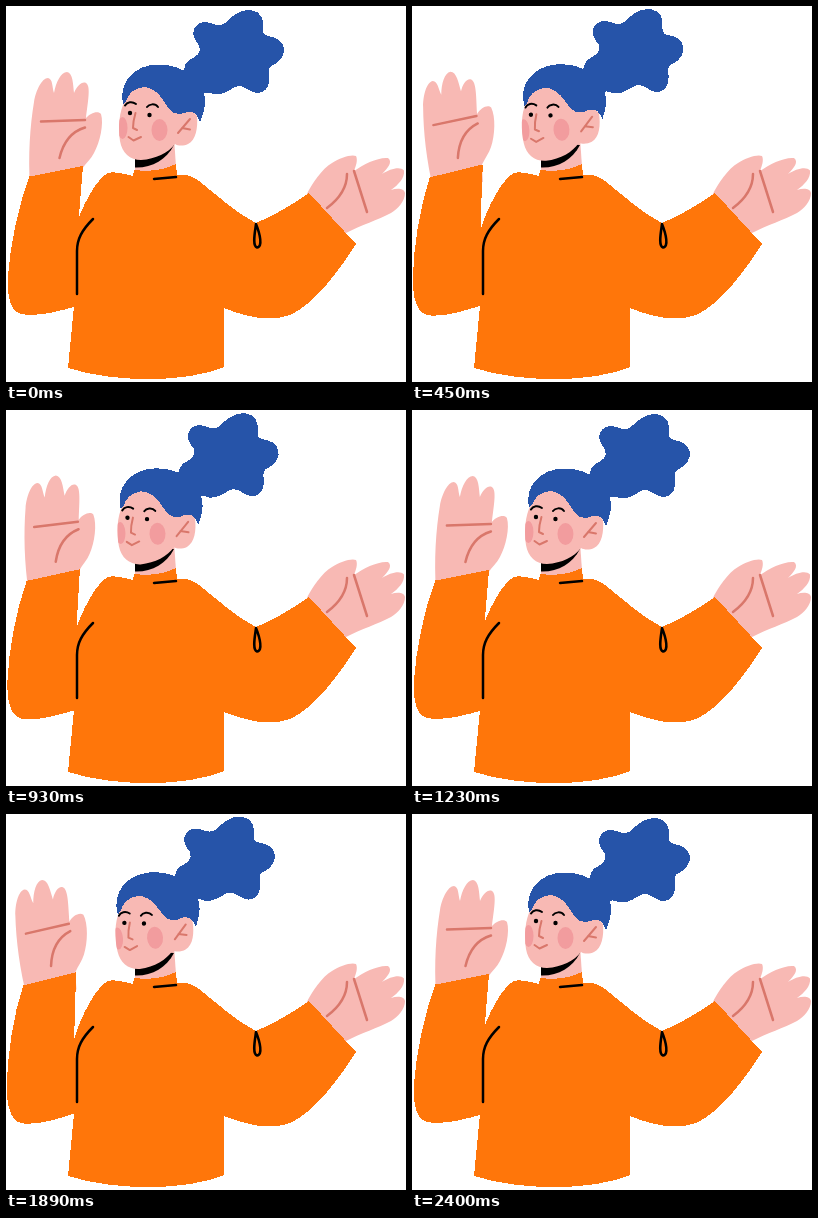
Write an HTML page that moves like this. It is 400x376 px and loops after 2430 ms.

```html
<!DOCTYPE html>
<html lang="en">
<head>
<meta charset="utf-8">
<title>Waving woman</title>
<style>
  html, body { margin: 0; width: 100%; height: 100%; overflow: hidden; background: #fff; }
  svg { display: block; width: 400px; height: 376px; }
  .blue { fill: #2654a9; }
  .orange { fill: #ff760a; }
  .blue, .orange { shape-rendering: crispEdges; }
  .skin { fill: #f8b9b4; }
  .cheek { fill: #f29c9e; }
  .crease, .ink { fill: none; stroke-width: 2.5; stroke-linecap: round; stroke-linejoin: round; }
  .crease { stroke: #d9776b; }
  .ink { stroke: #000; }
  .thin { stroke-width: 2; }
</style>
</head>
<body>
<svg viewBox="0 0 400 376">
  <defs>
    <path id="faceShape" d="M119 95C113 105 112 122 114 135C116 147 124 154 135 154C150 153 162 147 169 138C172 140 178 140 182 138C190 134 192 122 191 110L165 80L140 76L124 82Z"/>
    <clipPath id="faceClip"><use href="#faceShape"/></clipPath>
  </defs>

  <g id="hand">
    <path class="skin" d="M24 180C22 150 24 120 28 96C30 84 36 72 42 72C47 73 46 81 48 87C50 76 55 66 61 66C67 67 67 78 68 87C71 80 76 75 80 77C85 80 82 95 80 112C84 107 92 104 95 108C98 118 94 136 88 147C85 153 80 157 76 163L74 180Z"/>
    <path class="crease" d="M35 115.500L79 114M53.500 152C57 137 64 126 79 121.500"/>
  </g>
  <path id="sleeve" class="orange" d="M23.500 170.500L77 160C75.500 180 73 205 72 225L85 290L68 301C50 306 30 311 15 308C4 305 1 290 2 270C4 240 12 200 23.500 170.500Z"/>

  <path class="skin" d="M300 190C306 177 316 163 326 157C334 152 345 148 350 150C352 154 350 160 348 165C358 158 372 151 382 152C387 156 382 162 376 168C384 163 394 160 398 164.500C399 172 392 179 385 184C391 182 398 182 399 187C399 195 392 203 385 207C372 214 355 219 340 227L335 230Z"/>
  <path class="crease" d="M321 202C333 193 341 181 341 168M348 165L361 206"/>

  <path class="skin" d="M129 145V175H171L168 132Z"/>
  <path d="M129 152V161.500C146 162 160 154 168 139L150 138Z"/>
  <path class="orange" d="M73 211C80 193 92 172 102 167C110 165 118 168 127 170L128 164C145 166 158 164 170 158L171 169C180 168 187 170 193 175C212 190 230 207 250 217C268 210 290 196 303 187L350 238C335 262 308 299 284 309C263 316 240 311 218 302V361C180 377 110 377 62 362L68 300L66 232Z"/>
  <path class="ink" d="M148 173L170 171M71 288V245C71 233 76 224 87 213M250 218C249 226 246 240 251 241.500C257 241 254 228 250 218Z"/>

  <path id="pony" class="blue" d="M178 72C176 60 181 54 187 52C195 48 196 41 190 35C184 26 189 17 198 16C207 16 211 22 219 17C226 10 234 3 245 4C256 6 258 14 257 23C256 29 261 30 267 31C275 33 279 40 278 46C276 55 269 58 265 60C261 63 264 68 263 76C262 85 254 89 247 86C240 83 236 78 229 81C222 85 215 90 207 88C200 85 196 86 196 94L180 85Z"/>

  <g id="head">
    <use class="skin" href="#faceShape"/>
    <g clip-path="url(#faceClip)">
      <g id="features">
        <ellipse class="cheek" cx="116.500" cy="122" rx="5" ry="11"/>
        <ellipse class="cheek" cx="153.500" cy="124" rx="8" ry="11"/>
        <circle cx="124" cy="107" r="2.200"/>
        <circle cx="143.500" cy="109" r="2.200"/>
        <path class="ink thin" d="M119 99.500C121 96 126 95 130 98M141 101C143 98 149 97 152 101"/>
        <path class="crease thin" d="M129.500 107C128 112 127 117 127 122L131 124M122.500 131L127.500 134.500L135 131"/>
      </g>
    </g>
    <path class="crease thin" d="M172 127L184 113M176 122L184 123.500"/>
    <path class="blue" d="M117 98C112 76 129 58.500 152 58.500C165 58.500 176 62 184 69C194 76 200 88 199 98C198 106 196 111 194 116C191 107 187 105 181 106C174 109 168 109 163 103C157 95 152 82 138 81C128 82 122 88 120 95Z"/>
  </g>
</svg>
<script>
  const LOOP = 2430, STEP = 30, SWAY = 1200, LAG = 65;
  const part = id => document.getElementById(id);
  const [hand, sleeve, pony, head, features] =
    ["hand", "sleeve", "pony", "head", "features"].map(part);

  // 0 leans right, 1 leans left
  const sway = t => (1 - Math.cos(2 * Math.PI * t / SWAY)) / 2;
  const turn = (el, deg, x, y) => el.setAttribute("transform", `rotate(${deg} ${x} ${y})`);
  const shift = (el, x, y) => el.setAttribute("transform", `translate(${x} ${y})`);

  function draw(now) {
    const t = Math.floor(now % LOOP / STEP) * STEP;
    const p = sway(t);
    const late = sway(Math.max(0, t - LAG));
    turn(hand, -11.6 * p, 49, 196);
    turn(sleeve, -3.05 * p, 40, 296);
    turn(head, -4.4 * p, 147, 170);
    shift(features, -1.2 * p, 0);
    shift(pony, -9.2 * late, -1.4 * late);
  }

  const start = performance.now();
  function tick() {
    draw(performance.now() - start);
    requestAnimationFrame(tick);
  }
  tick();
</script>
</body>
</html>
```
